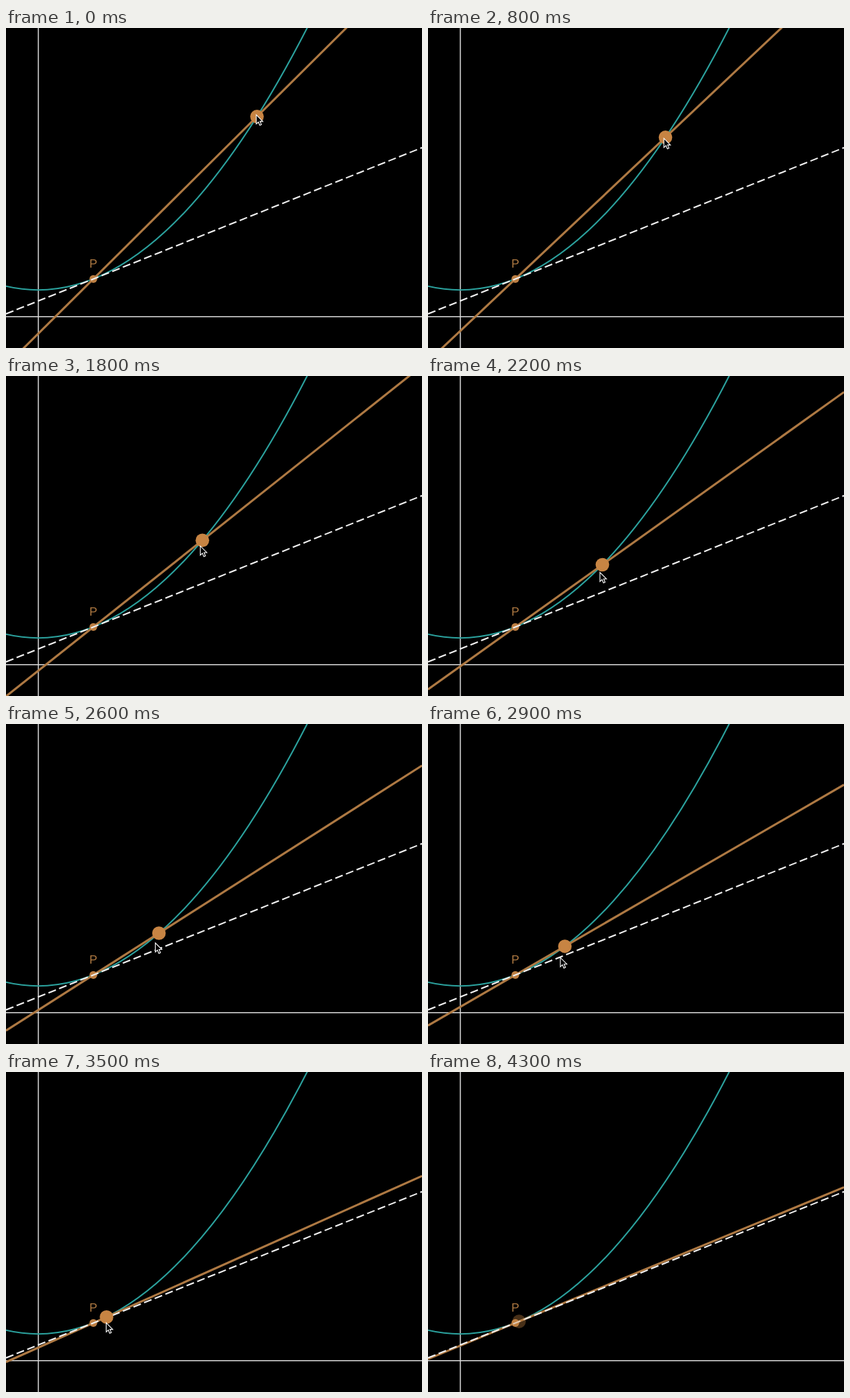
Recreate the animation shown at these times as an HTML page. Size 600 by 462 pixels, loop 4.6 s.

```html
<!DOCTYPE html>
<html lang="en">
<head>
<meta charset="utf-8">
<title>Secant approaching a tangent</title>
<style>
  html, body { margin: 0; width: 100%; height: 100%; overflow: hidden; background: #000; }
  svg { display: block; width: 600px; height: 462px; }
  path { fill: none; }
  text { font: 17px "Liberation Sans", Arial, sans-serif; fill: #b07a42; text-anchor: middle; }
  #cursor { fill: #000; stroke: #fff; stroke-width: 1.1; }
</style>
</head>
<body>
<svg viewBox="0 0 600 462">
  <path stroke="#dadada" stroke-width="1.5" d="M46.6 0V462M0 416.8H600"/>
  <path id="curve" stroke="#2ba19d" stroke-width="2.1"/>
  <line id="secant" stroke="#ae7943" stroke-width="3.1"/>
  <circle id="fixed" r="5.6" fill="#bd7f43"/>
  <line id="tangent" stroke="#f0f0f0" stroke-width="2.1" stroke-dasharray="11.5 5"/>
  <text x="126" y="346">P</text>
  <circle id="moving" r="9.8" fill="#c78443"/>
  <path id="cursor" d="M0 0V13.2L3 10.4L5.1 15.2L7.4 14.2L5.4 9.5H9.4Z"/>
</svg>
<script>
const LOOP = 4600, STEP = 100;
const A = 0.002515, CX = 46.5, CY = 378.2, PX = 126;
const f = x => CY - A * (x - CX) ** 2;

// [time, x of the dragged point, pointer offset x, pointer offset y]
const poses = [
  [300, 362, -1, -2.5],
  [800, 342.5, -2.3, 1.5],
  [1400, 315, -2.5, 5.5],
  [2200, 251.5, -3.5, 11],
  [2900, 197.4, -6.5, 16.3],
  [3500, 145, -0.5, 8.3],
  [4300, 131.3, -0.5, 8.3]
];

const clamp = v => Math.min(1, Math.max(0, v));

function poseAt(t) {
  const i = Math.max(1, poses.findIndex(p => p[0] >= t));
  const a = poses[i - 1], b = poses[i];
  const u = clamp((t - a[0]) / (b[0] - a[0]));
  return a.map((v, k) => v + (b[k] - v) * u);
}

function set(id, attrs) {
  const el = document.getElementById(id);
  for (const k in attrs) el.setAttribute(k, attrs[k]);
}

// Line meeting the curve at P and at qx; the tangent when qx is P itself
function chord(id, qx) {
  const slope = A * (PX + qx - 2 * CX);
  const y = x => f(PX) - slope * (x - PX);
  set(id, { x1: 0, y1: y(0), x2: 600, y2: y(600) });
}

const R = 400, rise = A * R * R;
set("curve", { d: `M${CX - R} ${CY - rise}Q${CX} ${CY + rise} ${CX + R} ${CY - rise}` });
set("fixed", { cx: PX, cy: f(PX) });
chord("tangent", PX);

function draw(now) {
  const t = Math.min(4300, Math.floor(now % LOOP / STEP) * STEP);
  const [, x, dx, dy] = poseAt(t);
  chord("secant", x);
  set("moving", { cx: x, cy: f(x), opacity: 1 - 0.64 * clamp((t - 4000) / 300) });
  set("cursor", {
    transform: `translate(${x + dx} ${f(x) + dy})`,
    opacity: t < 4200 ? 1 : 0
  });
}

let start;
function tick(now) {
  start ??= now;
  draw(now - start);
  requestAnimationFrame(tick);
}
draw(0);
requestAnimationFrame(tick);
</script>
</body>
</html>
```
